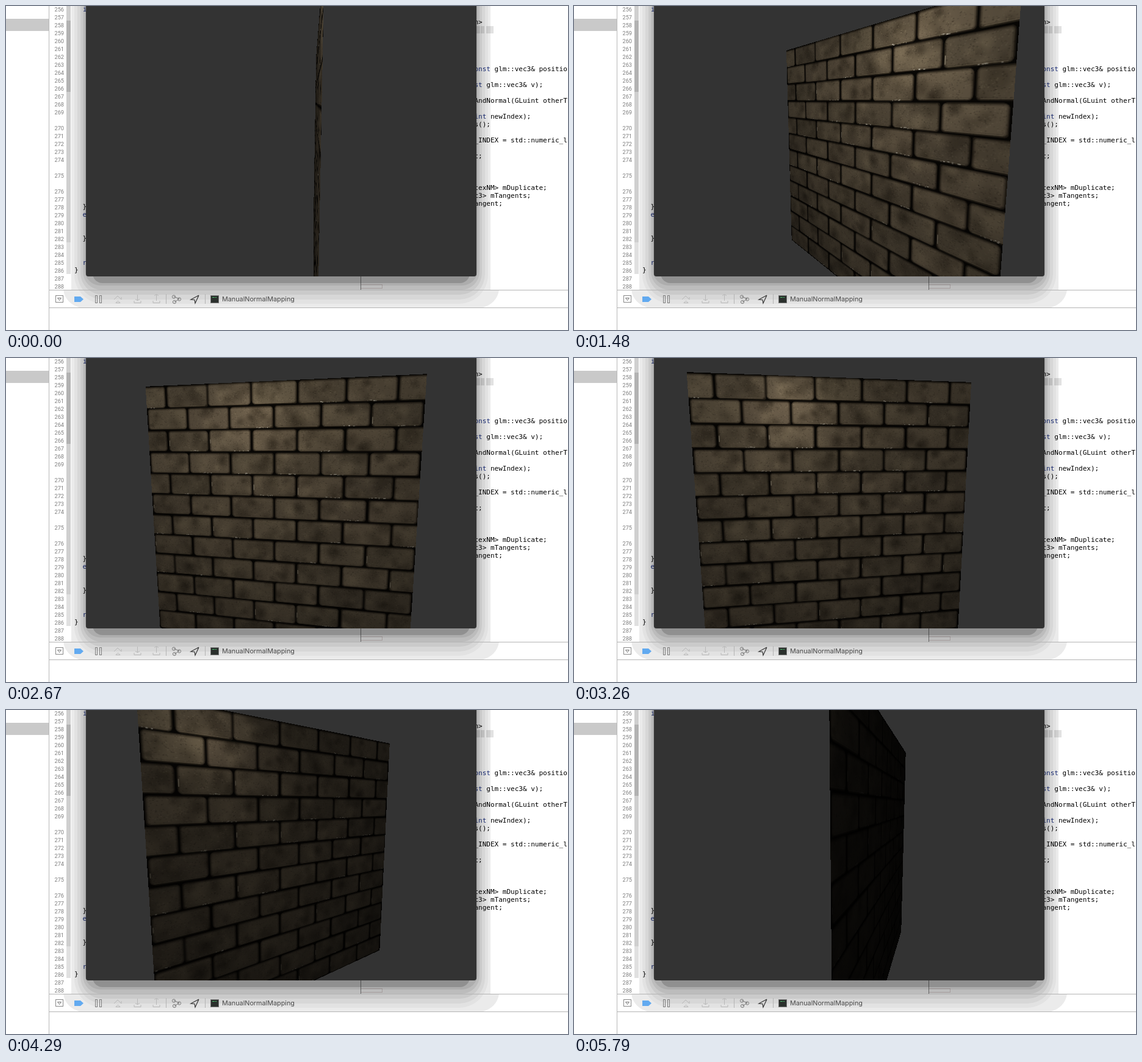
Animation of 921x532 px, one loop 5940 ms. Source, as an HTML page with a canvas:

```html
<!DOCTYPE html>
<html lang="en">
<head>
<meta charset="utf-8">
<title>ManualNormalMapping</title>
<style>
html, body { margin: 0; width: 100%; height: 100%; overflow: hidden; background: #fff; }
#desk { position: absolute; left: 0; top: 0; }
#view { position: absolute; left: 131px; top: 0; width: 640px; height: 444px;
  overflow: hidden; background: #333; border-radius: 0 0 4px 4px; }
#wall { position: absolute; left: 0; top: 0; width: 640px; height: 640px; transform-origin: 0 0; }
#wall > * { position: absolute; left: 0; top: 0; width: 640px; height: 640px; }
</style>
</head>
<body>
<canvas id="desk" width="921" height="532"></canvas>
<div id="view"><div id="wall"><canvas id="bricks" width="640" height="640"></canvas><div id="shade"></div></div></div>
<script>
const byId = id => document.getElementById(id);
let seed = 7;
const rnd = () => (seed = (seed * 16807) % 2147483647) / 2147483647;
const span = (a, b) => a + (b - a) * rnd();

// ---------- editor behind the window ----------
function drawDesk() {
  const c = byId('desk').getContext('2d');
  const box = (x, y, w, h, col) => { c.fillStyle = col; c.fillRect(x, y, w, h); };
  const text = (s, x, y, font, col, align = 'left') => {
    c.font = font; c.fillStyle = col; c.textAlign = align; c.fillText(s, x, y);
  };
  const line = (col, w, ...p) => {
    c.strokeStyle = col; c.lineWidth = w; c.beginPath();
    for (let i = 0; i < p.length; i += 2) c.lineTo(p[i], p[i + 1]);
    c.stroke();
  };
  const ring = (x, y, r) => { c.beginPath(); c.arc(x, y, r, 0, 7); c.stroke(); };
  const mono = '11px "DejaVu Sans Mono", monospace', navy = '#1b2f80';

  box(0, 0, 921, 532, '#fff');
  box(0, 21, 70, 20, '#c9c9c9');
  box(70, 0, 1, 532, '#b8b8b8');
  box(99, 0, 7, 440, '#e0e0e0');
  box(99, 0, 7, 388, '#cfcfcf');
  box(99, 24, 7, 117, '#b2b2b2');

  // lines 269, 274 and 275 wrap once
  for (let n = 256; n <= 288; n++) {
    const wraps = (n > 269) + (n > 274) + (n > 275);
    text(n, 95, 8.5 + 13 * (n - 256 + wraps), '9.2px Roboto, sans-serif', '#7d7d7d', 'right');
  }
  for (const [s, x, y] of [['i', 126, 9], ['e', 125.5, 346], ['r', 125.5, 425]]) text(s, x, y, mono, navy);
  for (const [x, y] of [[125.5, 333], [125.5, 385], [112, 437]]) text('}', x, y, mono, '#000');

  const code = [['n>', 30], ['onst glm::vec3& positio', 107], ['st glm::vec3& v);', 133],
    ['AndNormal(GLuint otherT', 159], ['int newIndex);', 185], ['s();', 198],
    ['_INDEX = std::numeric_l', 224], ['t;', 250], ['texNM> mDuplicate;', 302],
    ['c3> mTangents;', 315], ['angent;', 328]];
  for (const [s, y] of code) {
    text(s, 767.5, y, mono, '#000');
    const word = s.match(/^(onst|st|int) /);
    if (word) {
      box(767, y - 9, word[1].length * 6.62, 12, '#fff');
      text(word[1], 767.5, y, mono, navy);
    }
  }
  for (const x of [771, 778, 787, 793]) box(x, 33, 6, 12, '#e2e2e2');

  box(581, 444, 1, 22, '#888');
  box(582, 457, 35, 1, '#e0d6d6');
  box(582, 463, 35, 1, '#e0d6d6');
  box(616, 457, 1, 7, '#e0d6d6');

  // banded window shadow, mirrored around x = 451
  const band = (x, bottom, r, a) => {
    c.fillStyle = `rgba(0,0,0,${a})`; c.beginPath();
    c.roundRect(x, -60, 2 * (451 - x), bottom + 60, r); c.fill();
  };
  c.fillStyle = 'rgba(0,0,0,.08)'; c.beginPath();
  c.moveTo(94, 467); c.quadraticCurveTo(98, 488, 120, 495);
  c.lineTo(782, 495); c.quadraticCurveTo(804, 488, 808, 467);
  c.lineTo(794, 467); c.lineTo(794, 0); c.lineTo(107, 0); c.lineTo(107, 467); c.fill();
  band(112, 489, 48, .04);
  band(117, 482, 42, .05);
  band(122, 474, 36, .06);
  band(126, 466, 30, .07);
  band(129, 459, 26, .08);
  band(142, 455, 16, .17);

  // debug bar
  box(71, 466, 850, 1, '#b4b4b4');
  box(71, 495, 850, 1, '#b4b4b4');
  c.strokeStyle = '#888'; c.lineWidth = 1;
  c.strokeRect(81.5, 475.5, 12, 11);
  line('#777', 1, 84.5, 479.5, 90.5, 479.5, 87.5, 483.5, 84.5, 479.5);
  c.fillStyle = '#62aaf0'; c.beginPath();
  for (const p of [[112, 477], [122, 477], [127, 481.5], [122, 486], [112, 486]]) c.lineTo(...p);
  c.fill();
  c.strokeStyle = '#808080';
  c.strokeRect(146.5, 475.5, 3, 12);
  c.strokeRect(153.5, 475.5, 3, 12);
  const pale = '#b8b8b8';
  line(pale, 1, 177, 482, 183, 476, 189, 482, 189, 478);
  line(pale, 1, 180, 487.5, 187, 487.5, 183.5, 484, 180, 487.5);
  for (const [x, d] of [[215, 1], [246, -1]]) {
    line(pale, 1, x + .5, 474, x + .5, 484);
    line(pale, 1, x - 3, 478.5 + 3 * d, x + .5, 478.5 + 5 * d, x + 4, 478.5 + 3 * d);
    line(pale, 1, x - 5, 484, x - 5, 487.5, x + 6, 487.5, x + 6, 484);
  }
  box(262, 473, 1, 16, '#b4b4b4');
  box(326, 473, 1, 16, '#b4b4b4');
  line('#777', 1, 275, 477, 284, 481, 276, 486);
  for (const p of [[275, 477.5], [284, 481.5], [276, 486]]) ring(...p, 2.6);
  line('#333', 1.2, 316, 475, 303, 482, 309, 482.5, 310, 488, 316, 475);
  box(335, 475, 14, 13, '#777');
  box(336, 476, 12, 11, '#2b302d');
  box(338, 478, 4, 1, '#4dbb6c');
  box(343, 478, 2, 1, '#4dbb6c');
  text('ManualNormalMapping', 354, 485, '10.8px Inter, sans-serif', '#4a4a4a');
}

// ---------- brick texture: 12 rows of 6, every other row shifted by half ----------
function drawBricks() {
  const c = byId('bricks').getContext('2d'), W = 640 / 6, H = 640 / 12;
  c.fillStyle = '#0a0805';
  c.fillRect(0, 0, 640, 640);
  for (let row = 0; row < 12; row++) for (let k = 0; k < 7; k++) {
    const x = (k - (row % 2 ? 0 : .5)) * W + span(.5, 2.5), y = row * H + span(.5, 2);
    const w = W - span(2, 4), h = H - span(2, 3.5), m = span(.85, 1.1);
    c.save();
    c.beginPath();
    c.roundRect(x, y, w, h, [1, 2, 3, 4].map(() => span(4, 10)));
    c.fillStyle = `rgb(${124 * m},${109 * m},${86 * m})`;
    c.fill();
    c.clip();
    // soft stains, then grain
    for (let i = 0; i < 9; i++) {
      const px = x + w * rnd(), py = y + h * rnd(), r = span(8, 28);
      const g = c.createRadialGradient(px, py, 0, px, py, r), tone = rnd() < .6 ? '20,14,6' : '180,160,125';
      g.addColorStop(0, `rgba(${tone},.24)`);
      g.addColorStop(1, `rgba(${tone},0)`);
      c.fillStyle = g;
      c.fillRect(x, y, w, h);
    }
    for (let i = 0; i < 260; i++) {
      c.fillStyle = rnd() < .6 ? 'rgba(15,10,5,.2)' : 'rgba(210,194,162,.17)';
      c.fillRect(x + w * rnd(), y + h * rnd(), span(.8, 3), span(.7, 1.8));
    }
    // dark rounded rims with a paler lower edge
    for (const [width, alpha] of [[9, .18], [5, .3], [2.5, .45]]) {
      c.beginPath();
      c.roundRect(x, y, w, h, 7);
      c.lineWidth = width; c.strokeStyle = `rgba(12,8,3,${alpha})`;
      c.stroke();
    }
    c.fillStyle = 'rgba(205,185,150,.3)';
    c.fillRect(x + 7, y + h - 3.5, w - 14, 1.5);
    c.restore();
    // wet glints along the lower and left rims
    if (rnd() < .5) {
      const gx = x + w * span(.05, .6);
      for (let i = 0; i < 7; i++) {
        c.fillStyle = `rgba(255,248,228,${span(.3, 1)})`;
        c.fillRect(gx + span(0, w * .38), y + h - span(1.5, 3.5), span(1, 4), 1.4);
      }
    }
    if (rnd() < .3) {
      c.fillStyle = 'rgba(240,225,195,.7)';
      c.fillRect(x + 1.5, y + h * span(.3, .6), 1.5, h * span(.15, .35));
    }
  }
}

// ---------- motion ----------
// step, wall angle, centre x, centre distance, top above eye level, dimming
const keys = [
  [0, -97, .25, 1.79, .455, .4],
  [4, -77.2, .1325, 1.77, .46, .1],
  [10, -48, .043, 1.787, .476, 0],
  [18, -9, -.049, 1.793, .484, 0],
  [22, 7, -.072, 1.795, .506, .1],
  [29, 31.7, .128, 1.79, .531, .45],
  [39, 70.6, .257, 1.76, .526, .86]
];
const last = keys.length - 1;

function slope(i, j) {
  const a = keys[Math.max(i - 1, 0)], b = keys[Math.min(i + 1, last)];
  return (b[j] - a[j]) / (b[0] - a[0]);
}

function pose(n) {
  let i = 0;
  while (i < last - 1 && n >= keys[i + 1][0]) i++;
  const a = keys[i], b = keys[i + 1], d = b[0] - a[0], s = (n - a[0]) / d, r = 1 - s;
  return [1, 2, 3, 4, 5].map(j =>
    a[j] * (1 + 2 * s) * r * r + b[j] * (3 - 2 * s) * s * s +
    d * s * r * (slope(i, j) * r - slope(i + 1, j) * s));
}

const HALF = .965, F = 415.7, PITCH = Math.atan(.118);
const sp = Math.sin(PITCH), cp = Math.cos(PITCH);

// homogeneous view coordinates of a world vector
const project = (x, dist, h) => {
  const z = dist * cp - h * sp;
  return [320 * z + F * x, 204 * z - F * (h * cp + dist * sp), 0, z];
};

function draw(n) {
  const [deg, x, dist, top, dimming] = pose(n);
  const a = deg * Math.PI / 180, co = Math.cos(a), si = Math.sin(a), k = 2 * HALF / 640;
  const m = [
    ...project(k * co, k * si, 0),
    ...project(0, 0, -k),
    0, 0, 1, 0,
    ...project(x - HALF * co, dist - HALF * si, top)
  ].map(v => v / dist);
  byId('wall').style.transform = `matrix3d(${m.map(v => v.toFixed(8))})`;

  // the bright spot wanders against the turn and fades later than the rest
  const dim = Math.max(dimming, 0), lit = 640 * (.38 - .0068 * deg);
  const dark = (v, d) => `rgba(0,0,0,${(1 - (1 - v) * (1 - d)).toFixed(3)})`;
  byId('shade').style.background =
    `radial-gradient(circle 760px at ${lit.toFixed(1)}px 50px, ${dark(.02, dim * dim)}, ` +
    `${dark(.28, dim)} 15%, ${dark(.45, dim)} 35%, ${dark(.7, dim)} 95%)`;
}

let shown = -1;
function tick(now) {
  const n = Math.min(39, Math.floor((now % 5940 + 17) / 148.5));
  if (n !== shown) draw(shown = n);
  requestAnimationFrame(tick);
}

drawDesk();
drawBricks();
draw(0);
requestAnimationFrame(tick);
</script>
</body>
</html>
```
